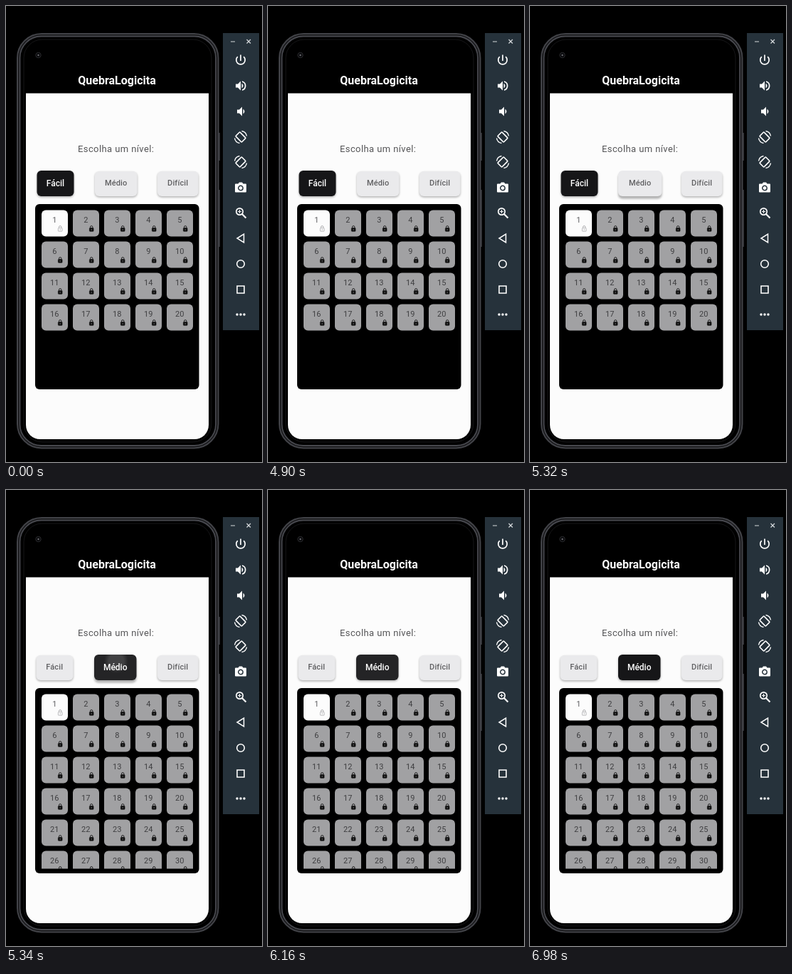
Animation, 360 px wide and 640 px high, one loop 8 s. Source, as an HTML page:

```html
<!DOCTYPE html>
<html lang="pt">
<head>
<meta charset="utf-8">
<title>Níveis</title>
<style>
  html, body { margin: 0; width: 100%; height: 100%; overflow: hidden; background: #000; }
  svg { display: block; width: 100vw; height: 100vh; font-family: Roboto, sans-serif; }
  text { text-anchor: middle; }
  .tool { fill: none; stroke: #fff; stroke-width: 1.7; }
  .tool .fill { fill: #fff; stroke: none; }
</style>
</head>
<body>
<svg viewBox="0 0 360 640">
  <defs>
    <clipPath id="grid"><rect x="46" y="284" width="222" height="247.5"/></clipPath>
    <clipPath id="press"><rect x="124" y="231" width="59.500" height="36" rx="6"/></clipPath>
    <filter id="soft" x="-30%" y="-40%" width="160%" height="190%"><feGaussianBlur stdDeviation="1.6"/></filter>
    <radialGradient id="wave">
      <stop offset=".6" stop-color="#fff"/><stop offset="1" stop-color="#fff" stop-opacity="0"/>
    </radialGradient>
  </defs>
  <rect width="360" height="640"/>

  <g id="phone">
    <path d="M298 178h3v39h-3zM298 258h3v80h-3z" fill="#333438"/>
    <rect x="16" y="39" width="282.500" height="581.500" rx="34" fill="#151517" stroke="#424348" stroke-width="2"/>
    <rect x="19.500" y="42.500" width="275.500" height="574.500" rx="30" fill="#000" stroke="#47484e" stroke-width="1.800"/>
    <rect x="25" y="47" width="264" height="565" rx="26" fill="none" stroke="#161618"/>
    <path d="M28 122.500H285V588a20 20 0 0 1-20 20H48a20 20 0 0 1-20-20z" fill="#fcfcfc"/>
    <circle cx="45.500" cy="69" r="3.700" fill="#08080a" stroke="#2a2b2e"/>
    <circle cx="45.500" cy="69" r="1.200" fill="#6c6d72"/>
    <text x="156" y="109.700" font-size="16" font-weight="700" fill="#fff">QuebraLogicita</text>
    <text x="154.700" y="205.300" font-size="13" letter-spacing=".4" fill="#555557">Escolha um nível:</text>
  </g>

  <g id="buttons"></g>
  <circle id="ripple" cx="155" cy="240" fill="url(#wave)" clip-path="url(#press)"/>
  <g id="labels"></g>
  <rect x="41" y="278" width="230.500" height="260" rx="6"/>
  <g id="tiles" clip-path="url(#grid)"></g>

  <rect x="305" y="38" width="51" height="417" fill="#26323b"/>
  <path d="M316 50h6M338.500 47l5.500 5.500m0-5.500l-5.500 5.500" stroke="#d5d9dc" stroke-width="1.200"/>
  <g id="tools" class="tool"></g>
</svg>
<script>
const NS = 'http://www.w3.org/2000/svg';
const LOOP = 8000, SWITCH = 5340;
const $ = id => document.getElementById(id);

function add(parent, tag, attrs, text) {
  const el = document.createElementNS(NS, tag);
  set(el, attrs);
  if (text !== undefined) el.textContent = text;
  parent.appendChild(el);
  return el;
}

function set(el, attrs) {
  for (const k in attrs) el.setAttribute(k, attrs[k]);
}

// Toolbar icons, each drawn around its own centre
const rotate = `<rect x="-6" y="-4.200" width="12" height="8.400" rx="1" transform="rotate(45)"/>
  <path d="M1.500-8.500a8.500 8.500 0 0 1 7 7M-1.500 8.500a8.500 8.500 0 0 1-7-7" stroke-width="1.400"/>`;
const icons = [
  [76, '<path d="M0-7.500V1M-4.200-4.800A6.200 6.200 0 1 0 4.200-4.800"/>'],
  [112, '<path class="fill" d="M-7-2.500h3l4-4v13l-4-4h-3zM1.500-3.500q4 3.500 0 7z"/><path d="M2-6a6.200 6.200 0 0 1 0 12"/>'],
  [148, '<path class="fill" d="M-5-2.500h3l4-4v13l-4-4h-3zM3.500-3.500q4 3.500 0 7z"/>'],
  [184, rotate],
  [219, `<g transform="scale(-1 1)">${rotate}</g>`],
  [255, '<path class="fill" d="M-7-5.500h3.500l1.500-2h4l1.500 2H7q1 0 1 1v10q0 1-1 1H-7q-1 0-1-1v-10q0-1 1-1z"/><circle r="3.200" cy=".5" stroke="#26323b" stroke-width="1.500"/>'],
  [290, '<circle cx="-1.500" cy="-1.500" r="4.700"/><path d="M2 2l5.500 5.500" stroke-width="2.200"/><path d="M-4-1.500h5m-2.500-2.500v5" stroke-width="1.200"/>'],
  [326, '<path d="M4.500-5.800V5.800L-5 0z" stroke-width="1.500"/>'],
  [362, '<circle r="5.300" stroke-width="1.600"/>'],
  [398, '<path d="M-5-5H5V5H-5z" stroke-width="1.600"/>'],
  [433, '<g class="fill"><circle cx="-5" r="1.700"/><circle r="1.700"/><circle cx="5" r="1.700"/></g>']
];
for (const [y, shape] of icons) {
  add($('tools'), 'g', { transform: `translate(330 ${y})` }).innerHTML = shape;
}

function addTile(n) {
  const x = 50 + 44 * ((n - 1) % 5), y = 286.5 + 44 * Math.floor((n - 1) / 5);
  const open = n === 1;
  const g = add($('tiles'), 'g', { transform: `translate(${x} ${y})` });
  add(g, 'rect', { width: 37, height: 37, rx: 6, fill: open ? '#fcfcfc' : '#a1a1a3' });
  add(g, 'text', { x: 18.3, y: 17.3, 'font-size': 11, 'letter-spacing': .1, fill: open ? '#606062' : '#3f3f41' }, n);
  const ink = open ? '#a0a0a2' : '#111';
  add(g, 'path', { d: 'M24.500 25v-1.200a1.700 1.700 0 0 1 3.400 0v1.200', fill: 'none', stroke: ink, 'stroke-width': .9 });
  add(g, 'rect', {
    x: 23.4, y: 25.1, width: 5.6, height: 4.6, rx: .6,
    fill: open ? '#fcfcfc' : ink, stroke: ink, 'stroke-width': .7
  });
  add(g, 'circle', { cx: 26.2, cy: 27.4, r: .7, fill: open ? ink : '#8a8a8c' });
  return g;
}
const tiles = Array.from({ length: 30 }, (_, i) => addTile(i + 1));

function addButton(label, x, w, cx) {
  const g = add($('buttons'), 'g', {});
  const shade = add(g, 'rect', { rx: 6, filter: 'url(#soft)' });
  const face = add(g, 'rect', { rx: 6 });
  const text = add($('labels'), 'text', { 'font-weight': 500 }, label);
  return { x, w, cx, shade, face, text };
}
const easy = addButton('Fácil', 42.5, 52, 68.2);
const medium = addButton('Médio', 125, 59.5, 154.7);
const hard = addButton('Difícil', 213, 57.5, 241.7);

const gray = v => `rgb(${v},${v},${v + 2})`;

function drawButton(b, on, lift, glow) {
  const x = b.x + (on ? (b === easy ? 1 : -1) : -lift);
  const w = b.w + (on ? 0 : 2 * lift);
  const y = on ? 231 : 232 - lift;
  const h = on ? 36 : 35 + lift;
  set(b.face, { x, y, width: w, height: h, fill: gray(on ? 22 + 14 * glow : 234) });
  set(b.shade, { x, y: y + 1.5 + 2 * lift, width: w, height: h, opacity: .3 });
  set(b.text, {
    x: b.cx + (on ? (b === easy ? 1.2 : -1) : 0), y: on ? 253 : 252.4,
    'font-size': on ? 12 : 11, 'letter-spacing': on ? 0 : .15,
    fill: on ? '#fff' : '#606062'
  });
}

function ramp(t, a, b) {
  const p = Math.min(1, Math.max(0, (t - a) / (b - a)));
  return p * p * (3 - 2 * p);
}

function draw(t) {
  const on = t >= SWITCH;
  const lift = ramp(t, 4900, 5200) - ramp(t, 5440, 5620);
  const spread = ramp(t, 5440, 5620);
  const glow = 1 - spread + ramp(t, 5720, 6160) - ramp(t, 6560, 6980);
  drawButton(easy, !on, 0, 0);
  drawButton(medium, on, lift, glow);
  drawButton(hard, false, 0, 0);
  set($('ripple'), { r: 17 + 28 * spread, opacity: on ? .13 * (1 - spread) : 0 });
  tiles.forEach((g, i) => set(g, { visibility: on || i < 20 ? 'visible' : 'hidden' }));
}

const start = performance.now();
function tick(now) {
  draw(Math.max(0, now - start) % LOOP);
  requestAnimationFrame(tick);
}
draw(0);
requestAnimationFrame(tick);
</script>
</body>
</html>
```
